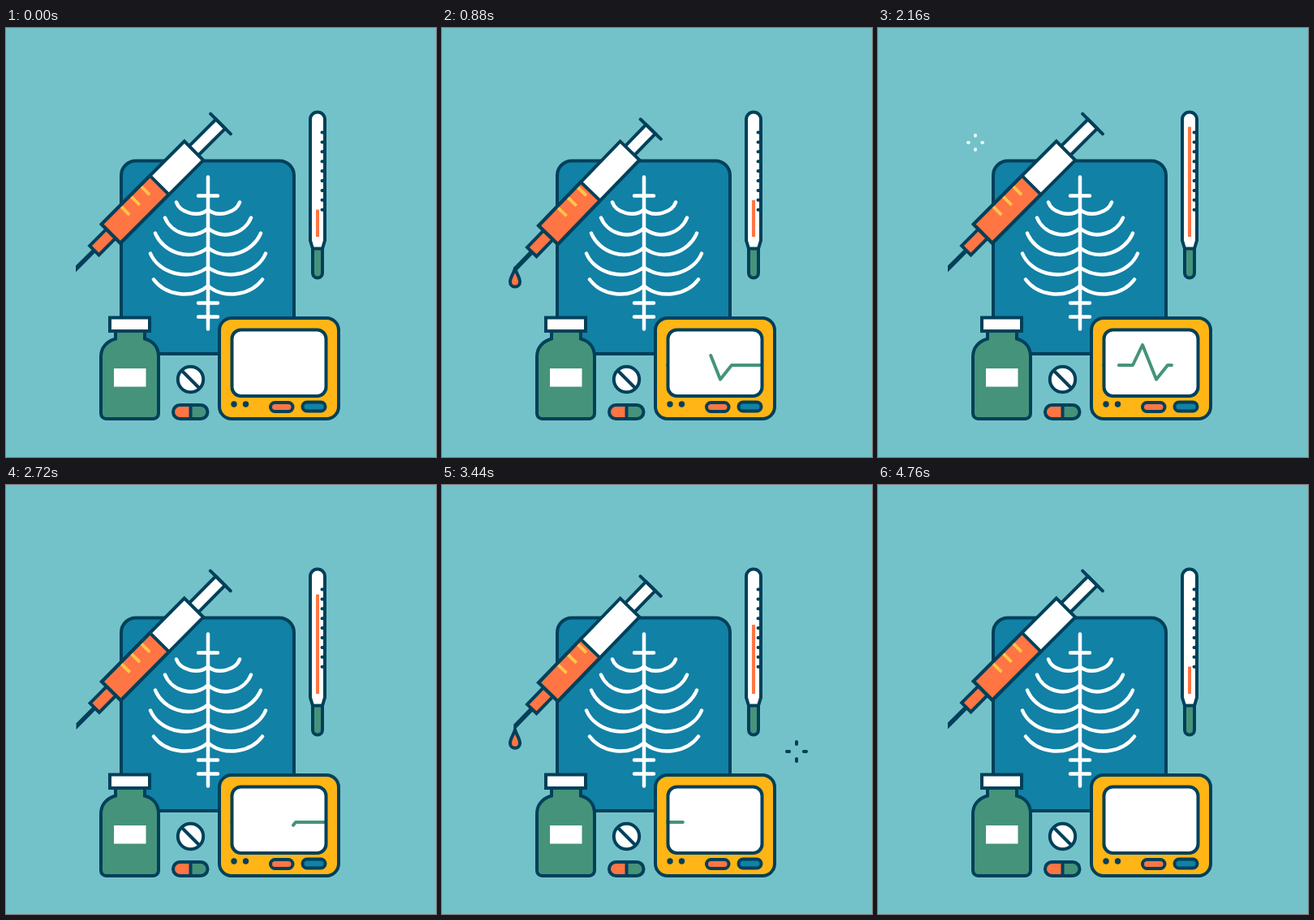
Recreate the animation shown at these times as an HTML page. Size 530 px wide and 528 px high, loop 4.8 s.

```html
<!DOCTYPE html>
<html lang="en">
<head>
<meta charset="utf-8">
<title>Medical kit</title>
<style>
  html, body { margin: 0; width: 100%; height: 100%; overflow: hidden; background: #74c2c9; }
  svg { display: block; width: 100%; height: 100%; }
  .ln { stroke: #00405a; stroke-width: 4; }
  .dark { fill: #00405a; }
  .white { fill: #fff; }
  .blue { fill: #1181a6; }
  .green { fill: #45937a; }
  .orange { fill: #ff7543; }
  .yellow { fill: #ffb515; }
  .none { fill: none; }
  .round { stroke-linecap: round; stroke-linejoin: round; }
</style>
</head>
<body>
<svg viewBox="0 0 530 528" xmlns="http://www.w3.org/2000/svg">
  <rect width="530" height="528" fill="#74c2c9"/>
  <g transform="translate(0 .5)">

  <!-- x-ray -->
  <rect class="blue ln" x="142" y="163" width="213" height="237.5" rx="18"/>
  <g class="none round" stroke="#fff" stroke-width="4.5">
    <path d="M249 183V370M237 206H261M237 338H261M237 355H261"/>
    <path id="ribs"/>
  </g>

  <!-- thermometer -->
  <path class="green ln" d="M378 269V301a6 6 0 0 0 12 0V269Z"/>
  <path class="white ln" stroke-linejoin="round" d="M375 112a9 9 0 0 1 18 0V261L390 271H378L375 261Z"/>
  <path id="ticks" class="none ln round"/>
  <path id="mercury" class="none" stroke="#ff7543" stroke-width="4"/>

  <!-- syringe -->
  <path id="drop" class="orange ln" stroke-linejoin="round" vector-effect="non-scaling-stroke"
    d="M0 0C1 6 6 11 6 17A6 6 0 0 1 -6 17C-6 11 -1 6 0 0Z"/>
  <g id="syringe">
    <g id="plunger">
      <rect class="white ln" x="-46.7" y="-8" width="70" height="16"/>
      <path class="ln round" d="M-46.7 -17.5V17.5"/>
    </g>
    <path class="dark" d="M172 2.8H203L208.6 -2.8H172Z"/>
    <rect class="orange ln" x="144.5" y="-8" width="29" height="16"/>
    <rect class="white" width="144.5" y="-16.5" height="33"/>
    <rect id="liquid" class="orange ln" y="-16.5" height="33"/>
    <path class="none" stroke="#ffc24a" stroke-width="4" d="M77 14.5V0M94.5 14.5V0M112 14.5V0"/>
    <rect class="none ln" width="144.5" y="-16.5" height="33"/>
  </g>

  <!-- bottle -->
  <path class="green ln" d="M135 372V382C124 385 117 393 117 404V474a6.5 6.5 0 0 0 6.5 6.5H181.5a6.5 6.5 0 0 0 6.5 -6.5V404C188 393 182 385 171 382V372Z"/>
  <rect class="white ln" x="128" y="356" width="49" height="16.5"/>
  <rect class="white" x="133" y="418.5" width="39.5" height="22.5"/>

  <!-- pills -->
  <circle class="white ln" cx="227.5" cy="432" r="15.7"/>
  <path class="ln" d="M216.5 421L238.5 443"/>
  <path class="orange" d="M227.5 463.5H214.5a8.5 8.5 0 0 0 0 17H227.5Z"/>
  <path class="green" d="M227.5 463.5H240a8.5 8.5 0 0 1 0 17H227.5Z"/>
  <rect class="none ln" x="206" y="463.5" width="42.5" height="17" rx="8.5"/>
  <path class="ln" d="M227.5 463V481"/>

  <!-- monitor -->
  <rect class="yellow ln" x="263" y="356.5" width="147" height="124" rx="15"/>
  <rect class="white" x="278.5" y="371" width="116" height="81.5" rx="11"/>
  <path id="pulse" class="none round" stroke="#45937a" stroke-width="4"
    d="M278 414.5H314L326 389.5L343 432L357 414.5H394"/>
  <rect class="none ln" x="278.5" y="371" width="116" height="81.5" rx="11"/>
  <circle class="dark" cx="281" cy="462.5" r="3.7"/>
  <circle class="dark" cx="295.5" cy="462.5" r="3.7"/>
  <rect class="orange ln" x="326" y="460.5" width="27.5" height="11" rx="5.5"/>
  <rect class="blue ln" x="365.5" y="460" width="28" height="11" rx="5.5"/>

  <path id="spark" class="none ln round"/>
  <path id="glint" class="none round" stroke="#edf8f9" stroke-width="4"/>
  <path id="splash" class="none ln round" style="stroke-width:3.5"/>
  </g>
</svg>
<script>
const LOOP = 4800, BEAT = 2400, PULSE = 1600;
const el = id => document.getElementById(id);
const part = {};
for (const id of ['mercury', 'drop', 'syringe', 'plunger', 'liquid', 'pulse', 'spark', 'glint', 'splash']) part[id] = el(id);

const span = (t, a, b) => Math.min(1, Math.max(0, (t - a) / (b - a)));
const sine = x => (1 - Math.cos(Math.PI * x)) / 2;
const quad = x => x < 0.5 ? 2 * x * x : 1 - 2 * (1 - x) ** 2;
const out = x => 1 - (1 - Math.min(1, x)) ** 2;
const show = (node, on) => node.setAttribute('visibility', on ? 'visible' : 'hidden');

// each rib: outer end, two handles, joint height on the spine
const ribs = [
  [210, 214, 214, 226, 236, 234, 223],
  [196, 233, 203, 251, 229, 262, 246],
  [184, 252, 193, 275, 226, 288, 270],
  [178, 277, 188, 301, 224, 312, 294],
  [182, 309, 196, 328, 228, 334, 317]
];
const rib = ([x, y, a, b, c, d, e], m) => `M${m(x)} ${y}C${m(a)} ${b} ${m(c)} ${d} 249 ${e}`;
el('ribs').setAttribute('d', ribs.map(r => rib(r, x => x) + rib(r, x => 498 - x)).join(''));

let marks = '';
for (let i = 0; i < 9; i++) marks += `M389.5 ${128 + i * 11.9}H393`;
el('ticks').setAttribute('d', marks);

const pulseLen = part.pulse.getTotalLength();

// four strokes flying out from a centre
function burst(node, cx, cy, r, p) {
  show(node, p > 0 && p < 1);
  const a = r * p, b = r * out(p * 1.4) + 0.01;
  let d = '';
  for (const [x, y] of [[1, 0], [0, 1], [-1, 0], [0, -1]])
    d += `M${cx + x * a} ${cy + y * a}L${cx + x * b} ${cy + y * b}`;
  node.setAttribute('d', d);
}

function drawSyringe(t) {
  const push = 9.9 * (quad(span(t, 260, 940)) - quad(span(t, 1440, 2160)));
  const tilt = 0.9 * (sine(span(t, 200, 560)) - sine(span(t, 1080, 1400)));
  part.syringe.setAttribute('transform', `translate(231.5 150.5) rotate(${135 - tilt})`);
  part.plunger.setAttribute('transform', `translate(${push} 0)`);
  part.liquid.setAttribute('x', 60 + push);
  part.liquid.setAttribute('width', 84.5 - push);
}

function drawDrop(t) {
  const size = out(span(t, 480, 880)), fall = span(t, 960, 1400) ** 2;
  show(part.drop, t > 480 && t < 1400);
  part.drop.setAttribute('transform', `translate(${89 + size} ${295 + 158 * fall}) scale(${size || 0.01})`);

  const p = span(t, 1400, 1640), end = out(p * 1.75);
  show(part.splash, p > 0 && p < 1);
  const tick = s => {
    const at = k => `${85.5 + s * (1.5 + 5.5 * k)} ${473 - 11 * k}`;
    return `M${at(p)}L${at(end)}`;
  };
  part.splash.setAttribute('d', tick(-1) + tick(1));
}

function drawPulse(t) {
  const a = pulseLen * sine(span(t, 291, 1531));
  const b = pulseLen * sine(span(t, 100, 745));
  show(part.pulse, b - a > 0.1);
  part.pulse.setAttribute('stroke-dasharray', `0 ${a} ${Math.max(0, b - a)} ${pulseLen * 2}`);
}

function drawMercury(t) {
  const down = span(t, 2280, 4600);
  const level = sine(span(t, 490, 2280)) - (down + sine(down)) / 2;
  part.mercury.setAttribute('d', `M384 256.5V${223 - 103 * level}`);
}

function draw(ms) {
  const t = ms % LOOP, beat = t % BEAT;
  drawSyringe(beat);
  drawDrop(beat);
  drawPulse(t % PULSE);
  drawMercury(t);
  const start = t < BEAT ? 900 : 3040;
  burst(part.spark, 437, 327.5, 12, span(t, start, start + 540));
  burst(part.glint, 120, 140.5, 9, span(t, 1720, 2200));
}

let begin;
function tick(now) {
  if (begin === undefined) begin = now;
  draw(now - begin);
  requestAnimationFrame(tick);
}
draw(0);
requestAnimationFrame(tick);
</script>
</body>
</html>
```
